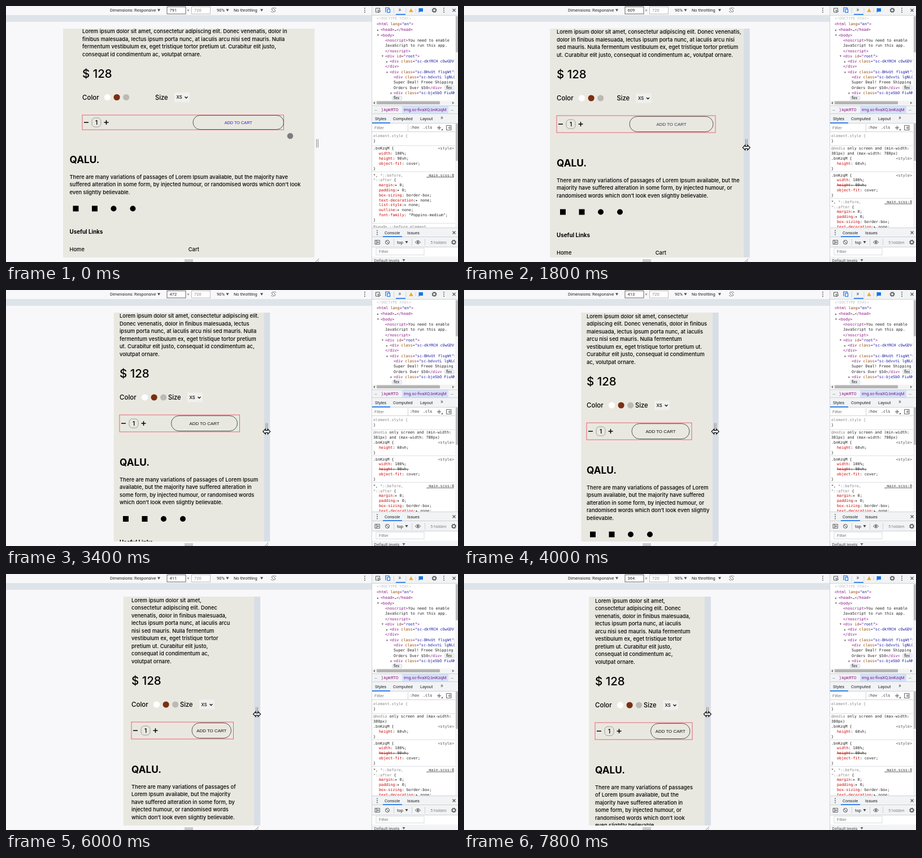
An HTML page for the animation above (8 s loop, 800 px wide and 453 px high).

```html
<!DOCTYPE html>
<html lang="en">
<head>
<meta charset="utf-8">
<title>Responsive product page</title>
<style>
html, body { margin: 0; width: 100%; height: 100%; overflow: hidden; background: #f8f8fa; }
svg { display: block; width: 800px; height: 453px; }
text { white-space: pre; }
.page { font-family: Inter, sans-serif; font-weight: 500; }
.ui { font-family: Roboto, sans-serif; }
.code { font-family: "DejaVu Sans Mono", monospace; }
.arial { font-family: "Liberation Sans", Arial, sans-serif; }
</style>
</head>
<body>
<svg viewBox="0 0 800 453">
  <defs>
    <clipPath id="pageClip"><rect id="clipBox" y="40" height="405"/></clipPath>
    <clipPath id="treeClip"><rect x="648" y="19" width="146" height="148"/></clipPath>
    <clipPath id="styleClip"><rect x="648" y="223" width="147" height="169"/></clipPath>
  </defs>
  <g id="chrome"></g>
  <g id="device"></g>
  <g id="tools"></g>
  <g id="rules" clip-path="url(#styleClip)"></g>
  <g id="pointer"></g>
</svg>
<script>
const LOOP = 8000, STEP = 200;
const $ = id => document.getElementById(id);
const esc = s => s.replace(/&/g, '&amp;').replace(/</g, '&lt;').replace(/>/g, '&gt;');

// Drawing helpers; text is placed by its vertical middle
const raw = (cls, x, y, size, markup, fill = '#222', more = '') =>
  `<text class="${cls}" x="${x}" y="${y + size * .36}" font-size="${size}" fill="${fill}" ${more}>${markup}</text>`;
const text = (cls, x, y, size, s, fill, more) => raw(cls, x, y, size, esc(s), fill, more);
const rect = (x, y, w, h, fill, more = '') =>
  `<rect x="${x}" y="${y}" width="${w}" height="${h}" fill="${fill}" ${more}/>`;
const dot = (x, y, r, fill, more = '') => `<circle cx="${x}" cy="${y}" r="${r}" fill="${fill}" ${more}/>`;
const line = (d, color = '#555', w = 1) => `<path d="${d}" fill="none" stroke="${color}" stroke-width="${w}"/>`;
const down = (x, y, fill = '#444') => `<path d="M${x - 2.5} ${y - 2}h5l-2.5 4.2z" fill="${fill}"/>`;
const dots = (x, y) => [-3.5, 0, 3.5].map(d => dot(x, y + d, .9, '#555')).join('');
const cross = (x, y) => line(`M${x - 2.5} ${y - 2.5}l5 5m0-5l-5 5`, '#555', 1.1);
const gear = (x, y) => dot(x, y, 2.8, 'none', 'stroke="#555" stroke-width="1.4"') +
  dot(x, y, 3.9, 'none', 'stroke="#555" stroke-width="1.2" stroke-dasharray="1.5 1.56"');

const BLUE = '#1a73e8', BAR = '#f1f3f5', RULE = '#cfd2d6';

function drawChrome() {
  const ui = (x, s, fill) => text('ui', x, 7.5, 7.5, s, fill);
  return rect(0, 0, 648, 453, '#f8f8fa') + rect(0, 16, 647, 12, '#dee4e9') +
    ui(184, 'Dimensions: Responsive') + down(270.5, 7.5) +
    rect(285, 1.5, 33, 12.5, '#fff', 'stroke="#666"') + ui(320.5, '×', '#666') +
    rect(328.5, 1.5, 33, 12.5, '#fff', 'stroke="#bbb"') + ui(333, '720', '#888') +
    ui(373, '90%') + down(392, 7.5) + ui(403, 'No throttling') + down(452.5, 7.5) +
    line('M470 5l3-2 4 6-3 2zM469 9l3 3M478 5l-3-3', '#666', .9) + dots(635, 7.5) +
    line('M316 449.5h15m-15 2.7h15', '#888', 1);
}

// Colours for tags, attribute names and values
const markup = s => s.replace(/(\w+)=("[^"]*"?)|<\/?\w*>?|>|[^<>=]/g, (m, key, value) =>
  key ? `<tspan fill="#994500">${key}</tspan><tspan fill="#881280">=</tspan><tspan fill="#1a1aa6">${value}</tspan>`
    : /[<>]/.test(m) ? `<tspan fill="#881280">${esc(m)}</tspan>` : m);

const TREE = [
  [656, 32, '<html lang="en">'], [663, 42, '<head>…</head>', '▸'], [663, 51.5, '<body>', '▾'],
  [671, 61, '<noscript>You need to enable'], [671, 70, 'JavaScript to run this app.'],
  [671, 79.5, '</noscript>'], [671, 88.5, '<div id="root">', '▾'],
  [679, 98, '<div class="sc-dkYRCH cOwGDV">', '▸'], [671, 107, '</div>'],
  [679, 117, '<div class="sc-BHvUt flsgWt">', '▾'], [686, 126, '<div class="sc-bdvvtL lgNLC">'],
  [686, 135, 'Super Deal! Freee Shipping'], [686, 144.5, 'Orders Over $50</div>'],
  [686, 154, '<div class="sc-bjeSbO FiuNM">', '▾']
];

function drawTree() {
  const pill = (x, y) => rect(x, y - 4, 18, 8, '#eef1f5', 'rx="4" stroke="#c5cbd3" stroke-width=".6"') +
    text('ui', x + 3, y, 6.3, 'flex');
  return `<g clip-path="url(#treeClip)">` + text('code', 656, 22, 6.75, '<!DOCTYPE html>', '#c0c0c0') +
    TREE.map(([x, y, s, arrow]) => raw('code', x, y, 6.75, markup(s)) +
      (arrow ? text('code', x - 7, y, 8, arrow, '#666') : '')).join('') +
    pill(776, 144.5) + pill(683, 163) + '</g>';
}

function drawTools() {
  const ui = (x, y, s, fill, more) => text('ui', x, y, 7.5, s, fill, more);
  const top = rect(647, 0, 153, 453, '#fff') + rect(647, 0, 153, 16, BAR) +
    line('M659 11h-4.500v-7h7v3M658 7l5 2-2 1-1 2z', '#555') +
    line('M672 11v-8h6v2M675 5.500h4.500v6h-4.500z', BLUE, 1.2) +
    line('M686.500 3v10M708 3v10', RULE) + ui(694.5, 7, '»', '#444', 'style="font-size:10px"') +
    rect(690, 14, 17, 1.6, BLUE) + '<path d="M717 4l3.700 6.800h-7.400z" fill="#f2ab1a"/>' +
    line('M725 4v7', RULE) + '<path d="M730.500 4h7.500v6h-5.500l-2 2z" fill="#1a73e8"/>' +
    gear(758, 7.5) + dots(775, 7.5) + cross(793, 7.5) + line('M647 16.500h153', RULE);
  const scroll = rect(795, 17, 5, 151, '#f3f3f3') + rect(796, 18, 4, 64, '#bcbcbc', 'rx="1"') +
    rect(648, 167.5, 152, 8, '#f3f3f3') + rect(656, 168.5, 112, 5.5, '#b4b4b4', 'rx="1"') +
    '<path d="M653 169l-3 2.500 3 2.500zM790 169l3 2.500-3 2.500z" fill="#777"/>';
  const crumbs = rect(648, 176, 152, 32, BAR) + line('M648 176.500h152M648 190.500h152M648 207.500h152', RULE) +
    rect(701, 177, 82, 13, '#d3e2f8') + ui(652, 182.5, '…') + ui(664.5, 183.5, ').kpkRTO', '#881280') +
    ui(704, 183.5, 'img.sc-fivaXQ.bnKzqM', '#881280') + ui(787, 182.5, '…') +
    ui(653, 199, 'Styles') + rect(648, 206, 32, 1.7, BLUE) + ui(685, 199, 'Computed') +
    ui(733, 199, 'Layout') + ui(769, 198.5, '»', '#444', 'style="font-size:10px"');
  const filter = ui(652, 215.5, 'Filter', '#777') + line('M711.500 209v13', RULE) +
    text('code', 715, 215, 6.75, ':hov') + text('code', 738, 215, 6.75, '.cls') +
    line('M763 215.500h7m-3.500-3.500v7', '#555', 1.1) + '<path d="M773 217v3h-3z" fill="#555"/>' +
    line('M779.500 211.500h8.500v8h-8.500zM786 213.500v4l-3-2z', '#555', .9) + line('M648 222.500h152', RULE) +
    rect(795, 208, 5, 184, '#f3f3f3') + rect(796, 208, 4, 66, '#bcbcbc', 'rx="1"');
  const con = rect(648, 392, 152, 34, BAR) + line('M648 392.500h152M648 408.500h152M648 426.500h152', RULE) +
    dots(657, 401) + ui(670, 401, 'Console') + rect(667, 407.3, 34, 1.7, BLUE) + ui(710, 401, 'Issues') + cross(793, 401) +
    line('M653 414.500h8.500v7h-8.500zM655.500 414v8M657.500 416.500l2.500 1.500-2.500 1.500z', '#555', .9) +
    dot(675, 418, 3.5, 'none', 'stroke="#555"') + line('M672.500 415.500l5 5', '#555') +
    line('M686.500 412v12M718.500 412v12M741.500 412v12', RULE) + ui(692, 418, 'top') + down(709, 418) +
    line('M724.500 418q4.500-6 9 0q-4.500 6-9 0z', '#555') + dot(729, 418, 1.7, '#555') +
    ui(751, 418, '5 hidden', '#888') + gear(792.5, 418) +
    rect(655, 428.5, 85, 12, '#fff', 'stroke="#d8dade"') + ui(660, 434.5, 'Filter', '#777') +
    rect(648, 443.5, 152, 10, BAR) + ui(651.5, 450.5, 'Default levels', '#555') + down(704, 450, '#666');
  return top + scroll + drawTree() + crumbs + filter + con + line('M647.500 0v453', RULE);
}

const RESET = ['*, *::before,', '*::after {', ' margin:▸ 0', ' padding:▸ 0', ' box-sizing: border-box',
  ' text-decoration:▸ none', ' list-style:▸ none', ' outline:▸ none', ' font-family: "Poppins-medium"', '}'];
const imageRule = h => ['.bnKzqM {', ' width: 100%', h + 'height: 90vh', ' object-fit: cover', '}'];
const faint = s => s.replace(/@media|\*::\w+,?/g, '<tspan fill="#888">$&</tspan>');

function drawRules(width, narrow) {
  const media = width < 780 ? [
    ...(narrow ? ['@media only screen and (max-width:', '380px)']
      : ['@media only screen and (min-width:', '381px) and (max-width: 780px)']),
    '.bnKzqM {', ' height: 60vh', '}'] : [];
  const code = (x, y, s, fill, more) => text('code', x, y, 6.75, s, fill, more);
  const sep = y => line(`M648 ${y}h147`, '#dcdee2');
  let y = 252;
  let out = code(650, 229.5, 'element.style {', '#888') + code(650, 239, '}') + sep(247);
  for (const row of [...media, ...imageRule(media.length ? '~' : ' '), ...RESET]) {
    if (/^[ ~]/.test(row)) {
      const [, name, value] = row.match(/^.([\w-]+)(:.*)$/);
      const strike = row[0] === '~' ? 'text-decoration="line-through"' : '';
      out += raw('code', 660, y, 6.75, `<tspan fill="#c80000">${name}</tspan>${value};`, '#222', strike);
    } else {
      out += raw('code', 650, y, 6.75, faint(row));
    }
    if (row === '.bnKzqM {') out += code(793, y, '<style>', '#555', 'text-anchor="end"');
    if (row === RESET[0]) out += code(793, y, '_main.scss:8', '#333', 'text-anchor="end" text-decoration="underline"');
    if (row === '}') { out += sep(y + 6); y += 3.2; }
    y += 8.8;
  }
  return out + code(650, y, 'Pseudo ::before element', '#777');
}

const ABOUT = ('Lorem ipsum dolor sit amet, consectetur adipiscing elit. Donec venenatis, dolor in finibus ' +
  'malesuada, lectus ipsum porta nunc, at iaculis arcu nisi sed mauris. Nulla fermentum vestibulum ex, eget ' +
  'tristique tortor pretium ut. Curabitur elit justo, consequat id condimentum ac, volutpat ornare.').split(' ');
const FOOTER = ('There are many variations of passages of Lorem Ipsum available, but the majority have suffered ' +
  'alteration in some form, by injected humour, or randomised words which don’t look even slightly believable.').split(' ');

// Start time, words per line of each paragraph
const WRAPS = [
  [0, '12 13 11 6', '14 14 3'],
  [800, '13 13 12 4', '14 14 3'],
  [1000, '12 13 11 6', '13 12 6'],
  [1400, '10 13 10 9', '12 11 8'],
  [1800, '10 12 10 10', '12 11 8'],
  [2200, '9 10 10 9 4', '10 11 9 1'],
  [2800, '9 8 9 9 7', '10 10 9 2'],
  [3200, '8 7 10 7 8 2', '9 8 8 6'],
  [3800, '6 7 7 6 7 6 3', '8 7 8 7 1'],
  [4400, '6 6 5 8 5 6 5 1', '7 6 7 5 6'],
  [4800, '5 4 5 6 6 5 5 4 2', '6 6 5 6 5 3'],
  [5600, '5 4 5 7 5 5 5 4 2', '7 6 7 5 6'],
  [7000, '5 4 5 6 6 5 5 4 2', '6 6 5 6 5 3']
];

// time, viewport width, text left, box right, button left, size label offset, first line
const PATH = [
  [0, 791, 135, 491.5, 331, 129, 45],
  [600, 785, 136.5, 490, 330, 128, 45],
  [800, 756, 122.5, 470, 306, 125, 46],
  [1800, 609, 164, 445, 293, 106.5, 46],
  [2800, 531, 185, 424, 288, 86, 45.5],
  [4000, 413, 217, 403, 297, 86, 46.5],
  [4800, 367, 231.5, 405, 331.5, 86, 46.5],
  [5200, 360, 233.5, 403.5, 330, 86, 46.5],
  [6000, 411, 222, 402.5, 329, 86, 46.5],
  [7800, 364, 232, 404, 330.5, 86, 47.5]
];

function pose(t) {
  const i = Math.max(1, PATH.findIndex(row => row[0] >= t));
  const a = PATH[i - 1], b = PATH[i], k = (t - a[0]) / (b[0] - a[0]);
  return a.map((v, n) => v + (b[n] - v) * k);
}

function paragraph(words, counts, x, y) {
  let at = 0;
  return counts.split(' ').map((n, i) =>
    text('page', x, y + i * 13.5, 9.35, words.slice(at, at += +n).join(' '), '#000')).join('');
}

function drawPage(t, [, width, x, boxR, btnL, sizeDx, y0]) {
  const desktop = width >= 780;
  const [, aboutRows, footRows] = WRAPS.filter(w => w[0] <= t).pop();
  const rows = s => s.split(' ').length - 1;
  const price = y0 + rows(aboutRows) * 13.5 + 34;
  const color = price + (desktop ? 42 : 42.5);
  const box = color + (desktop ? 44.5 : 46);
  const brand = box + (desktop ? 65.5 : 68.5);
  const foot = brand + 31;
  const icons = foot + rows(footRows) * 13.5 + 29;
  const fx = desktop ? x - 22.5 : x;
  const sx = x + sizeDx;
  const half = desktop ? 13 : 15, btnR = boxR - (desktop ? 0 : 4), btnH = desktop ? 25 : 27;

  const swatches = ['#fff', '#7b2f12', '#bbb9b4']
    .map((c, i) => dot(x + 44.5 + i * 16.6, color, 5.6, c)).join('');
  const select = rect(sx + 34, color - 8.5, 27, 17, '#f0f0ee') +
    text('page', sx + 37.5, color, 7.7, 'XS', '#000') + line(`M${sx + 52.5} ${color - 1}l2.500 2.500 2.500-2.500`, '#111', 1.3);
  const amount = line(`M${x + 3} ${box}h8M${x + 38.5} ${box}h8m-4-4v8`, '#000', 1.5) +
    rect(x + 17, box - 8, 16, 16, 'none', 'rx="5.500" stroke="#888" stroke-width=".8"') +
    text('page', x + 25, box, 9.8, '1', '#000', 'text-anchor="middle" style="font-weight:600"');
  const button = rect(btnL, box - btnH / 2, btnR - btnL, btnH, 'none', `rx="${btnH / 2}" stroke="#444" stroke-width=".9"`) +
    text('arial', (btnL + btnR) / 2, box, desktop ? 7.3 : 7.9, 'ADD TO CART',
      desktop ? '#3022d9' : t < 2400 ? '#33336b' : '#111', 'text-anchor="middle"');
  const social = [11, 44.5, 78, 112].map((dx, i) => i < 2
    ? rect(fx + dx - 5, icons - 5, 10, 10, '#000') : dot(fx + dx, icons, 5, '#000')).join('');

  return paragraph(ABOUT, aboutRows, x, y0) +
    text('page', x, price, 20.5, '$ 128', '#000') +
    text('page', x, color, 11.5, 'Color', '#000') + swatches +
    text('page', sx, color, 11.2, 'Size', '#000') + select +
    rect(x, box - half, boxR - x, half * 2, 'none', 'stroke="#e5566b" stroke-width=".9"') + amount + button +
    text('page', fx, brand, 17.2, 'QALU.', '#000', 'style="font-weight:700"') +
    paragraph(FOOTER, footRows, fx, foot) + social +
    text('page', fx, icons + 41, 9.8, 'Useful Links', '#000', 'style="font-weight:700"') +
    text('page', fx, icons + 72.5, 9.35, 'Home', '#000') +
    text('page', fx + 56 + .195 * width, icons + 72.5, 9.35, 'Cart', '#000');
}

function render(t) {
  const p = pose(t), width = p[1], left = 323.5 - width * .28125, right = 647 - left;
  const dragging = t >= 400;
  $('clipBox').setAttribute('x', left);
  $('clipBox').setAttribute('width', right - left);
  $('device').innerHTML = text('ui', 289.5, 7.5, 7.5, String(Math.round(width))) +
    rect(left, 40, right - left, 405, '#e9e8e0') +
    (dragging ? rect(right, 40, 11, 405, '#d8dee5') : '') +
    line(`M${right + 3.7} 235.500v15m2.700-15v15`, '#888') +
    line(`M${right + 2} 453l6-6m-2.500 6l2.500-2.500`, '#888') +
    `<g clip-path="url(#pageClip)">${drawPage(t, p)}</g>`;
  $('rules').innerHTML = drawRules(width, t >= 5000);
  $('pointer').innerHTML = dragging
    ? `<path transform="translate(${right + 5} ${t < 4400 ? 250.5 : 248})" d="M-6.500 0l4.500-4.500v2.700h4v-2.700l4.500 4.500-4.500 4.500v-2.700h-4v2.700z" fill="#fff" stroke="#111" stroke-width="1.200"/>`
    : dot(503 + t * .12, 230 + t * .03, 5.3, '#7d7d7d');
}

$('chrome').innerHTML = drawChrome();
$('tools').innerHTML = drawTools();
const start = performance.now();
let shown = -1;
function tick() {
  const step = Math.floor((performance.now() - start) % LOOP / STEP);
  if (step !== shown) render((shown = step) * STEP);
  requestAnimationFrame(tick);
}
tick();
</script>
</body>
</html>
```
